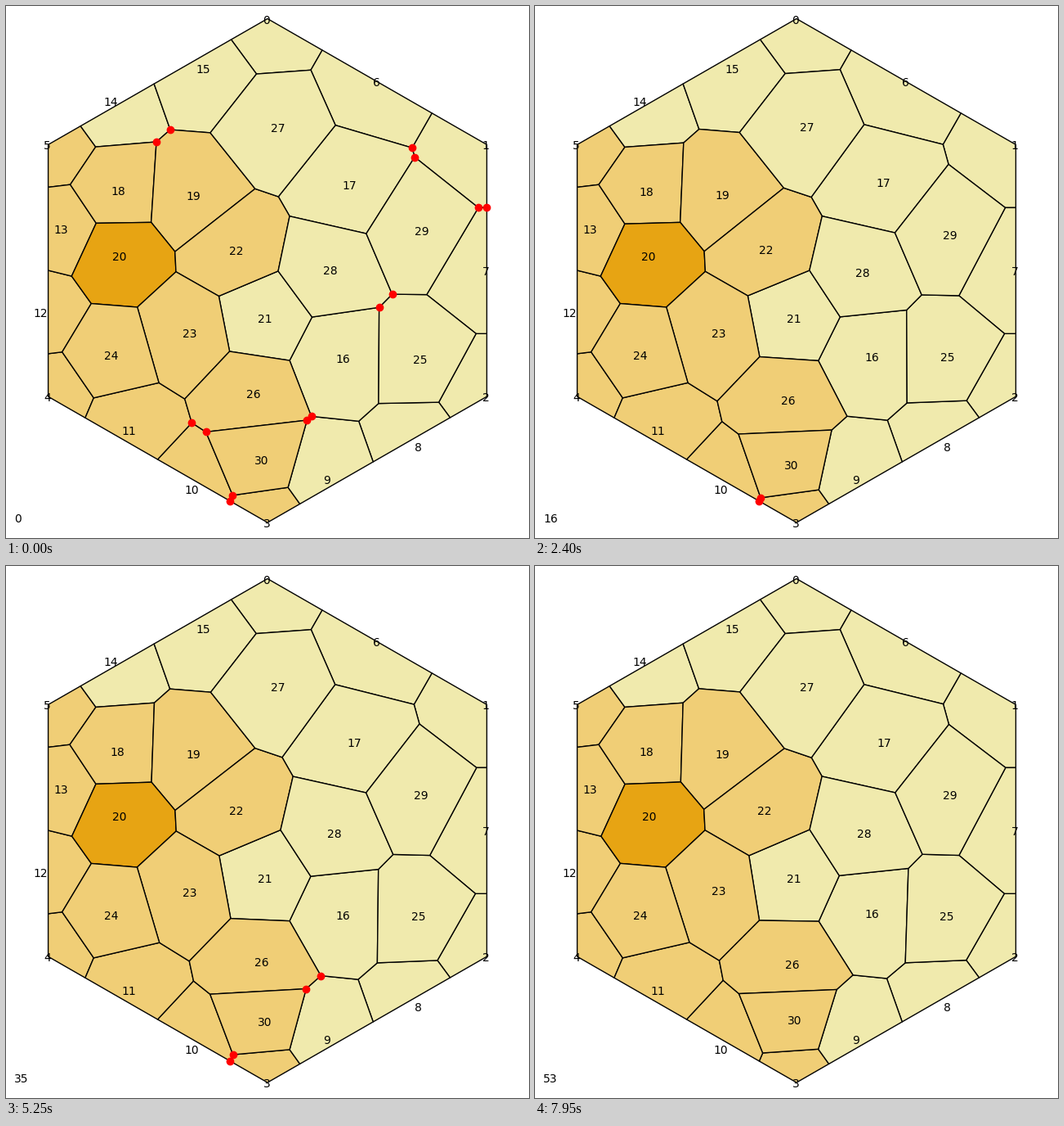
Recreate the animation shown at these times as a matplotlib script. Size 640 by 650 pixels, loop 9100 ms.

```python
import numpy as np
import matplotlib.pyplot as plt
from matplotlib.animation import FuncAnimation
from matplotlib.collections import PolyCollection

W, H, DPI = 640, 650, 100
TICK, TICKS_PER_STEP, LOOP, LAST = 50, 3, 9100, 53

MIN_SIDE, MIN_BORDER_SIDE = 24.6, 12.2  # shorter cell sides get stretched
RATE = 0.62                             # gradient step in pixels
FIRST_FREE = 16                         # corner and border sites stay put

PALE, AMBER, DEEP = "#f0eaad", "#f0ce76", "#e7a413"
AMBER_CELLS = {3, 4, 5, 10, 11, 12, 13, 18, 19, 22, 23, 24, 26, 30}

# Points are complex numbers, x + iy, with y pointing down.
CORNERS = [complex(320 + 309.9 * np.sin(a), 323.3 - 307.8 * np.cos(a))
           for a in np.arange(6) * np.pi / 3]
BORDER = [454 + 92.4j, 588.4 + 323.4j, 505.6 + 538.3j, 393.8 + 578j, 224 + 590j,
          147 + 518j, 39 + 374j, 64 + 272j, 125 + 116j, 238 + 76j]
FREE = [409 + 430.4j, 417 + 218j, 134 + 225j, 226 + 231j, 135.2 + 305j,
        313.5 + 381j, 278.5 + 298j, 221.2 + 399j, 125.7 + 426.2j, 503.5 + 431j,
        299.6 + 473j, 329.5 + 148j, 393.4 + 322j, 505.4 + 274j, 309 + 554j]


def clip(poly, a, b, owner):
    """Keep what is nearer to a than to b.

    A polygon is a list of (vertex, cell across the side that starts there).
    """
    dist = [((b - a).conjugate() * (z - (a + b) / 2)).real for z, _ in poly]
    out = []
    for i, (q, e) in enumerate(zip(poly, dist)):
        p, d = poly[i - 1], dist[i - 1]
        if (d > 0) != (e > 0):
            cut = p[0] + d / (d - e) * (q[0] - p[0])
            out.append((cut, owner if e > 0 else p[1]))
        if e <= 0:
            out.append(q)
    return out


def voronoi(sites):
    cells = []
    for i, a in enumerate(sites):
        poly = [(z, None) for z in CORNERS]
        for j, b in enumerate(sites):
            if i != j:
                poly = clip(poly, a, b, j)
        cells.append(poly)
    return cells


def short_sides(cells):
    """Yield (cell, neighbour, cells at the two ends, the two end points)."""
    for i, poly in enumerate(cells):
        n = len(poly)
        for k, (p, j) in enumerate(poly):
            if j is None or j < i:
                continue
            q, after = poly[(k + 1) % n]
            ends = poly[k - 1][1], after
            limit = MIN_BORDER_SIDE if None in ends else MIN_SIDE
            if abs(p - q) < limit:
                yield i, j, ends, (p, q)


def circumcenter(a, b, c):
    b, c = b - a, c - a
    return a + (abs(b)**2 * c - abs(c)**2 * b) / (b.conjugate() * c - b * c.conjugate())


def side_length(sites, i, j, ends, points):
    p, q = (z if k is None else circumcenter(sites[i], sites[j], sites[k])
            for k, z in zip(ends, points))
    return abs(p - q)


def stretch(sites, sides, eps=1e-4):
    """Move the free sites uphill on the lengths of all short sides."""
    moved = list(sites)
    for side in sides:
        i, j, ends, _ = side
        base = side_length(sites, *side)
        for k in (i, j, *ends):
            if k is None or k < FIRST_FREE:
                continue
            for axis in (1, 1j):
                probe = list(sites)
                probe[k] += eps * axis
                slope = (side_length(probe, *side) - base) / eps
                moved[k] += RATE * slope * axis
    return moved


def simulate():
    """Return (sites, cells, dots) for every step; the last one is at rest."""
    sites, states = CORNERS + BORDER + FREE, []
    for step in range(LAST + 1):
        cells = voronoi(sites)
        sides = list(short_sides(cells)) if step < LAST else []
        states.append((sites, cells, [z for *_, ends in sides for z in ends]))
        sites = stretch(sites, sides)
    return states


def cell_color(i):
    return DEEP if i == 20 else AMBER if i in AMBER_CELLS else PALE


def outlines(cells):
    return [[(z.real, z.imag) for z, _ in poly] for poly in cells]


states = simulate()
sites, cells, _ = states[0]

fig = plt.figure(figsize=(W / DPI, H / DPI), dpi=DPI, facecolor="white")
ax = fig.add_axes([0, 0, 1, 1])
ax.set_xlim(0, W)
ax.set_ylim(H, 0)
ax.axis("off")

mesh = PolyCollection(outlines(cells), edgecolors="black", linewidths=1,
                      facecolors=[cell_color(i) for i in range(len(cells))])
ax.add_collection(mesh)
dots, = ax.plot([], [], "ro", markersize=6, zorder=3)
font = dict(family="DejaVu Sans", fontsize=10, color="black", zorder=4)
labels = [ax.text(z.real, z.imag, str(i), **font) for i, z in enumerate(sites)]
counter = ax.text(10, 631, "0", **font)


def update(tick):
    step = min(tick // TICKS_PER_STEP, LAST)
    sites, cells, marked = states[step]
    mesh.set_verts(outlines(cells))
    dots.set_data([z.real for z in marked], [z.imag for z in marked])
    for label, z in zip(labels, sites):
        label.set_position((z.real - 5.5, z.imag + 6))
    counter.set_text(str(step))
    return [mesh, dots, counter, *labels]


anim = FuncAnimation(fig, update, frames=LOOP // TICK, interval=TICK,
                     init_func=lambda: update(0), repeat=True, repeat_delay=0)
plt.show()
```
